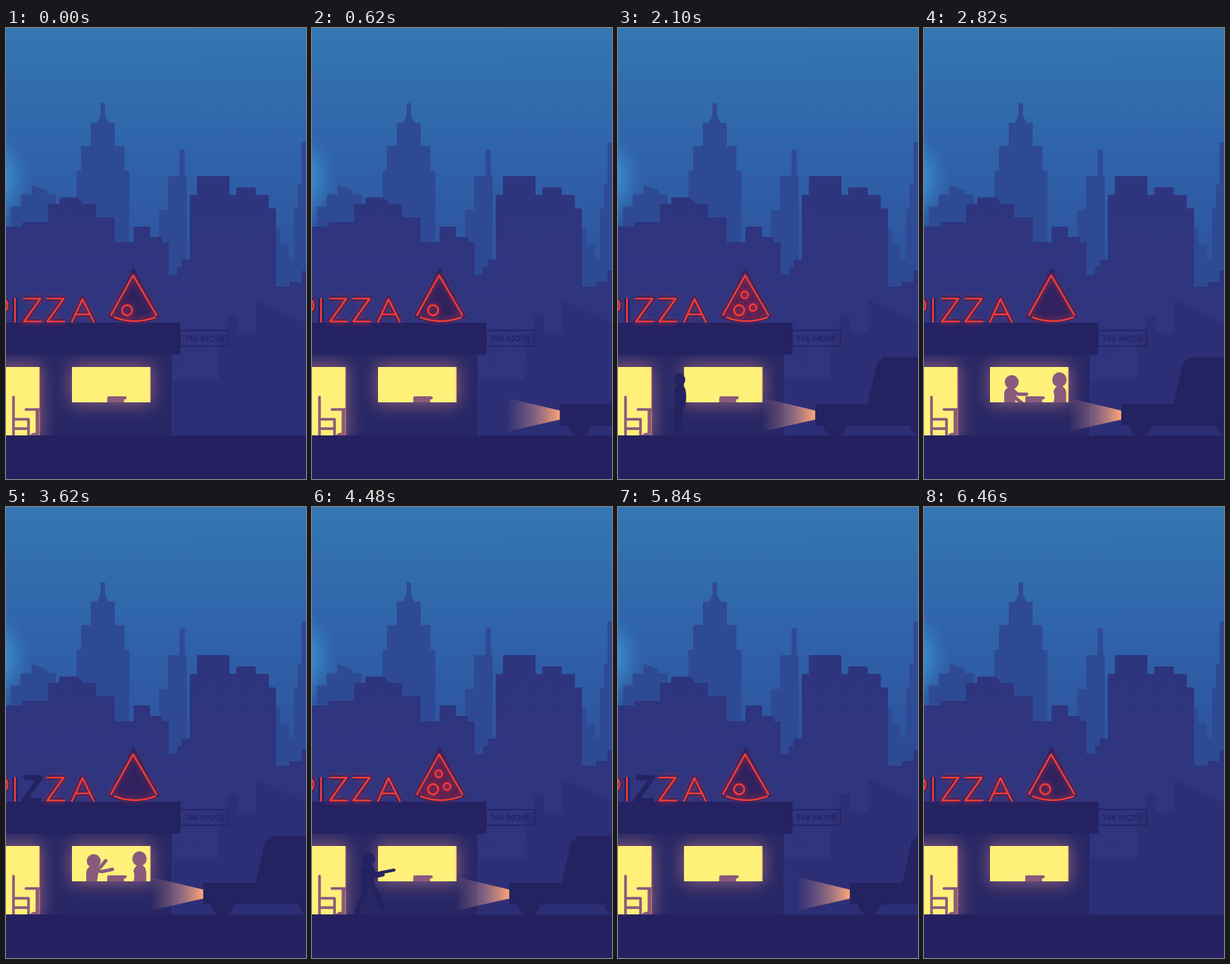
Write an HTML page that moves like this. It is 400 px wide and 600 px high and loops after 6560 ms.

```html
<!DOCTYPE html>
<html lang="en">
<head>
<meta charset="utf-8">
<title>Pizza night</title>
<style>
html, body { margin: 0; width: 100%; height: 100%; overflow: hidden; background: #252160; }
svg { display: block; width: 100%; height: 100%; }
.dark { fill: #252262; }
.plum { fill: #895a7c; }
.plumLine { fill: none; stroke: #895a7c; stroke-linecap: round; stroke-linejoin: round; }
.back { fill: none; stroke: #252262; stroke-width: 7; stroke-linejoin: round; }
.tube { fill: none; stroke: #ff3d32; stroke-width: 2.2; stroke-linecap: round; stroke-linejoin: round; }
.halo { fill: none; stroke: #e8303a; stroke-width: 5; opacity: .42; filter: url(#soft); }
.limb { fill: none; stroke: #252262; stroke-width: 7.5; stroke-linecap: round; stroke-linejoin: round; }
.round { stroke-width: 3; stroke-linejoin: round; }
</style>
</head>
<body>
<svg viewBox="0 0 400 600" preserveAspectRatio="none">
  <defs>
    <linearGradient id="sky" x2="0" y2="1">
      <stop offset="0" stop-color="#3476b3"/>
      <stop offset=".5" stop-color="#2f62a9"/>
      <stop offset="1" stop-color="#2f4f9c"/>
    </linearGradient>
    <linearGradient id="mid" x2="0" y2="1">
      <stop offset="0" stop-color="#2e357f"/>
      <stop offset="1" stop-color="#30347d"/>
    </linearGradient>
    <radialGradient id="moon">
      <stop offset="0" stop-color="#46b4ec"/>
      <stop offset=".4" stop-color="#3f9fdd" stop-opacity=".9"/>
      <stop offset="1" stop-color="#3476b3" stop-opacity="0"/>
    </radialGradient>
    <linearGradient id="beam">
      <stop offset="0" stop-color="#c98a88" stop-opacity="0"/>
      <stop offset=".45" stop-color="#c98a88" stop-opacity=".45"/>
      <stop offset="1" stop-color="#ffa676"/>
    </linearGradient>
    <filter id="soft" x="-60%" y="-60%" width="220%" height="220%" filterUnits="objectBoundingBox"><feGaussianBlur stdDeviation="3"/></filter>
    <filter id="wide" x="-60%" y="-60%" width="220%" height="220%"><feGaussianBlur stdDeviation="11"/></filter>
    <clipPath id="wall"><path d="M0 434H221V542H0Z"/></clipPath>
    <clipPath id="pane"><path d="M88 451H192.500V498H88Z"/></clipPath>
  </defs>

  <rect width="400" height="350" fill="url(#sky)"/>
  <circle cx="-36" cy="200" r="72" fill="url(#moon)"/>

  <g class="round" fill="#2f4a95" stroke="#2f4a95">
    <path d="M8 300V239H21V223H35.500V211L53 217V222.500H65V300Z"/>
    <path d="M95.500 300V191.500H101.500V158.500H114.500V127.500H122L127.500 117V101.500H130.500V117L136 127.500H143.500V158.500H156.500V191.500H163V300Z"/>
    <path d="M205.500 340V243.500H217.500V198.500H233V163H237V198.500H239.500V340Z"/>
    <path d="M350 360V268.500H364.500V289.500H375.500V308.500H385.500V241.500H390.500V210H395.500V153.500H410V360Z"/>
  </g>
  <path class="round" fill="url(#mid)" stroke="#2e357f" d="M-5 550V273.500H-1V265.500H23.500V259.500H57.500V235.500H72.500V227H95L103 235.500H118.500V253.500H143.500V286.500H171.500V265.500H190.500V279.500H206.500V286.500H215.500V330H229.500V319.500H235.500V309.500H246.500V223.500H256V198.500H296.500V223.500H308.500V213.500H331.500V223.500H349V241.500H358.500V345.500H379.500V339.500H395.500V324.500H405V550Z"/>
  <path fill="#2d2f76" d="M222 542V468H284V406H295V385Q295 382 298 382H306Q309 382 309 385V406H334V362L400 393V542Z"/>

  <rect width="221" height="108" y="434" fill="#282765"/>
  <g clip-path="url(#wall)" fill="#c07d87" opacity=".62" filter="url(#wide)">
    <rect x="-30" y="448" width="77" height="100"/>
    <rect x="86" y="448" width="109" height="53"/>
  </g>
  <rect y="451" width="45" height="91" fill="#fff07a"/>
  <path d="M44.700 451V542" stroke="#f58a62"/>
  <rect x="88" y="451" width="104.500" height="47" fill="#fff07a"/>
  <path d="M192.200 451V498" stroke="#f7b068" stroke-width=".8"/>
  <g class="plumLine" stroke-width="3.500">
    <path d="M10 491V542M10 520.500H30V542M10 533H30M26.500 507.500H44"/>
    <path d="M42 508V542" stroke-width="5" stroke-linecap="butt"/>
  </g>
  <path class="plum" d="M32 542Q34 538 40 538.500V542Z"/>

  <g clip-path="url(#pane)">
    <g id="guest">
      <circle class="plum" cy="471" r="9.300"/>
      <path class="plum" d="M-10 500V486Q-9 478 -2 478Q7 479 6 488L4 500Z"/>
      <g id="arms" class="plumLine" stroke-width="4.500">
        <path d="M0 483L11 485L25 482"/>
        <path d="M0 482L9 479L16 470.500"/>
      </g>
    </g>
    <g id="clerk">
      <ellipse class="plum" cy="468" rx="9.600" ry="10"/>
      <path class="plum" d="M-9 500Q-5 492 -8 484Q-6 476 1 476Q8 477 9 485V500Z"/>
    </g>
  </g>
  <path class="plum" d="M135 498V492Q135 490 137 490H159Q161 490 161 492T159 494H157.500V498Z"/>

  <rect class="dark" y="392" width="232.500" height="42.500"/>
  <rect x="232" y="402.500" width="64.500" height="21" fill="none" stroke="#252262" stroke-width="1.600"/>
  <text class="dark" x="264" y="417" text-anchor="middle" font-family="Lato, 'Open Sans', sans-serif" font-weight="700" font-size="11">746 MOSS</text>

  <g id="word" role="img" aria-label="PIZZA"></g>
  <g id="slice">
    <path class="back" stroke-width="8" d="M170 326L140 383Q170 396 201 383Z" style="fill:#282260"/>
    <path class="back" d="M170 323V330" stroke-linecap="round" style="stroke-width:5"/>
    <path id="fill" d="M170 333L144 382Q170 392 197 382Z" fill="#74204f" opacity=".4"/>
    <path class="halo" d="M170 329L140 382Q170 396 201 382Z"/>
    <path class="tube" d="M140 382L169.500 329L200.500 382M145 385Q171 395 199 385"/>
  </g>

  <g id="walker">
    <circle class="dark" cy="468" r="9"/>
    <path class="dark" d="M-9 504Q-12 489 -9 480Q-6 474 1 475Q8 476 9 484L7 504Z"/>
    <path id="legA" class="limb"/>
    <path id="legB" class="limb"/>
    <g id="carry">
      <path class="limb" style="stroke-width:5" d="M2 482L10 491L19 489"/>
      <path d="M11 487.500L34 483" stroke="#252262" stroke-width="4" stroke-linecap="round"/>
    </g>
  </g>

  <g id="car">
    <path fill="url(#beam)" d="M192 492L263 509V521L192 537Z"/>
    <path class="dark" d="M263 500H333L345 446Q346 442 351 442L354 438H520V529H263Z"/>
    <circle class="dark" cx="289" cy="528" r="15"/>
    <circle class="dark" cx="405" cy="528" r="15"/>
    <ellipse id="door" class="dark" cx="374" cy="528" rx="15" ry="14"/>
  </g>
  <rect y="542" width="400" height="58" fill="#252160"/>
</svg>
<script>
const LOOP = 6560;
const $ = id => document.getElementById(id);
const clamp = v => Math.max(0, Math.min(1, v));
const ramp = (t, a, b) => clamp((t - a) / (b - a));
const smooth = k => k * k * (3 - 2 * k);
const between = (t, a, b) => t >= a && t < b;
const show = (el, on) => { el.style.display = on ? '' : 'none'; };

function add(parent, tag, attrs) {
  const el = document.createElementNS('http://www.w3.org/2000/svg', tag);
  for (const name in attrs) el.setAttribute(name, attrs[name]);
  parent.append(el);
  return el;
}

function neon(parent, d) {
  add(parent, 'path', { class: 'back', d });
  const lit = add(parent, 'g', {});
  add(lit, 'path', { class: 'halo', d });
  add(lit, 'path', { class: 'tube', d });
  return lit;
}

const letters = [
  'M-20 391V360H-8Q2 360 2 369T-8 378H-20',
  'M12 360V391',
  'M24 360H46L24 390.500H47',
  'M55 360H77L55 390.500H78',
  'M88 391L102 360.500L117 391M93 381H111'
].map(d => neon($('word'), d));

// Pepperoni order: lower left, top, right
const dots = [[161.5, 375.5, 6.8], [169, 355, 4.6], [180, 372, 4.6]].map(([cx, cy, r]) => {
  const g = add($('slice'), 'g', {});
  add(g, 'circle', { class: 'halo', cx, cy, r });
  add(g, 'circle', { class: 'tube', cx, cy, r, 'stroke-width': 2 });
  return g;
});

// Dark spells: letter, from, to
const outages = [[2, 2280, 2400], [1, 4260, 4380]];
for (const [start, step] of [[880, 120], [3340, 120], [5660, 90]])
  letters.forEach((_, i) => outages.push([i, start + i * step, start + (i + 1) * step]));

function sign(t) {
  letters.forEach((el, i) =>
    show(el, !outages.some(([n, a, b]) => n === i && between(t, a, b))));

  const blinking = between(t, 1180, 5180);
  const flash = blinking && (t - 1180) % 640 < 320;
  const phase = (t + 100) % 640;
  const single = phase < 280 ? 0 : phase < 460 ? 1 : 2;
  dots.forEach((el, i) => show(el, blinking ? flash : i === single));
  $('fill').setAttribute('opacity', flash ? .55 : .1);
}

function car(t) {
  const arrive = 1 - ramp(t, 340, 980);
  const leave = ramp(t, 5600, 6120);
  $('car').setAttribute('transform', `translate(${215 * (arrive ** 2 + leave ** 2)} 0)`);
  show($('car'), between(t, 340, 6120));
  show($('door'), between(t, 1080, 1560));
}

function leg(el, hip, foot, lift) {
  const knee = (hip + foot) / 2 + 2;
  el.setAttribute('d', `M${hip} 501L${knee} ${519 - lift / 2}L${foot} ${538 - lift}`);
}

function walker(t) {
  const leaving = t > 3000;
  let x, dir, turn, swing, rise = 0;
  if (!leaving) {
    x = Math.max(82, 316 - (t - 1340) * .308);
    dir = -1;
    turn = 1 - .9 * ramp(t, 2200, 2320);
    swing = x > 82 ? 12 * Math.sin((t - 1340) / 75 + .9) * ramp(x, 82, 105) : 2;
    if (x < 105) turn *= .85 + .15 * ramp(x, 82, 105);
  } else {
    x = Math.min(367, Math.max(64, 75 + (t - 4480) * .418));
    dir = 1;
    turn = .1 + .9 * ramp(t, 4320, 4440);
    swing = x < 367 ? 15 * Math.cos((t - 4480) / 75) : 7;
    rise = -16 * smooth(ramp(t, 5220, 5380));
  }
  $('walker').setAttribute('transform', `translate(${x} ${rise}) scale(${dir * turn} 1)`);
  leg($('legA'), 3, 3 + swing, swing > 8 ? (swing - 8) * .7 : 0);
  leg($('legB'), -3, -swing, swing < -8 ? (-swing - 8) * .7 : 0);
  show($('carry'), leaving);
  show($('walker'), between(t, 1160, 2320) || between(t, 4320, 5380));
}

function inside(t) {
  const guest = 70 + 47 * (smooth(ramp(t, 2340, 2740)) - smooth(ramp(t, 3880, 4260)));
  const clerk = 206 - 28 * (smooth(ramp(t, 2480, 2900)) - smooth(ramp(t, 3960, 4300)));
  const reach = smooth(ramp(t, 2760, 2960)) * (1 - smooth(ramp(t, 3720, 3880)));
  const wave = 7 * Math.sin((t - 3620) / 90) * reach;
  $('guest').setAttribute('transform', `translate(${guest} 0)`);
  $('clerk').setAttribute('transform', `translate(${clerk} 0)`);
  $('arms').setAttribute('transform', `rotate(${65 * (1 - reach) + wave} 0 483)`);
  show($('guest'), between(t, 2340, 4260));
  show($('clerk'), between(t, 2480, 4300));
}

const begin = performance.now();
function draw() {
  const t = (performance.now() - begin) % LOOP;
  sign(t);
  car(t);
  walker(t);
  inside(t);
  requestAnimationFrame(draw);
}
draw();
</script>
</body>
</html>
```
